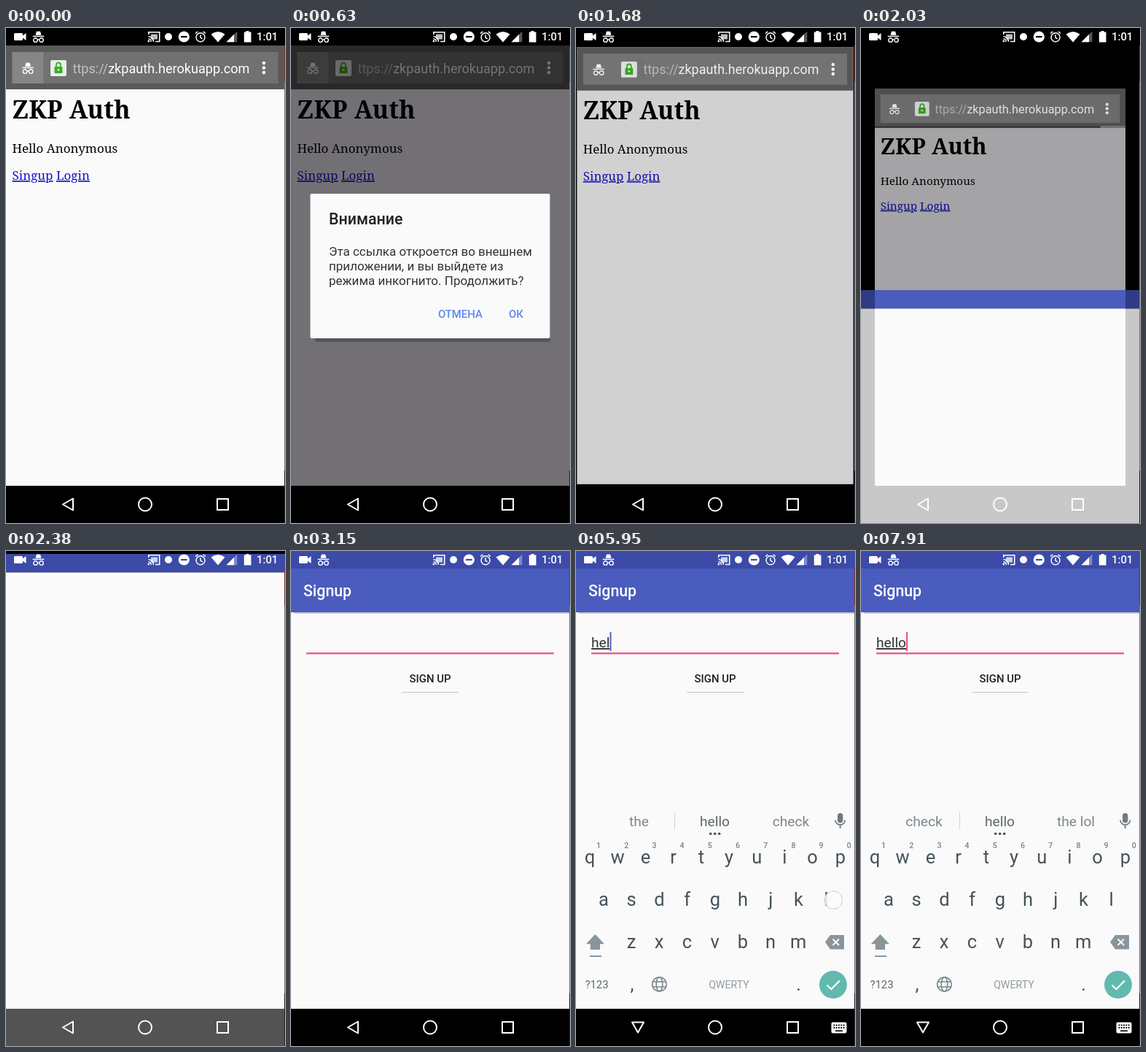
An HTML page that plays this animation: 383 px wide and 678 px high, repeating every 8 s.

```html
<!DOCTYPE html>
<html lang="en">
<head>
<meta charset="utf-8">
<title>Signup demo</title>
<style>
html, body { margin: 0; width: 100%; height: 100%; overflow: hidden; background: #000; }
svg { display: block; width: 100%; height: 100%; }
text { font-family: Roboto, "Noto Sans", sans-serif; white-space: pre; }
.serif text { font-family: "Noto Serif", serif; font-size: 17px; }
.med { font-weight: 500; }
.mid { text-anchor: middle; }
.u { text-decoration: underline; }
.line { fill: none; stroke: #fff; }
</style>
</head>
<body>
<svg viewBox="0 0 383 678" preserveAspectRatio="none">
<defs>
  <clipPath id="cutCard"><rect id="cardBox" y="24" width="382" height="603"/></clipPath>
  <clipPath id="cutUrl"><rect x="90" y="40" width="246" height="30"/></clipPath>
  <clipPath id="cutKeys"><rect y="340" width="383" height="287"/></clipPath>
  <linearGradient id="urlFade"><stop offset="0" stop-color="#717171"/><stop offset="1" stop-color="#717171" stop-opacity="0"/></linearGradient>
  <g id="spy">
    <path d="M-4-2.2-2.6-7.2Q-1.3-7.9 0-7.2 1.3-7.9 2.6-7.2L4-2.2Z" fill="#fff"/>
    <path d="M-7.8-.6H7.8" stroke="#fff" stroke-width="1.5"/>
    <g class="line" stroke-width="1.4"><circle cx="-4" cy="4.6" r="2.8"/><circle cx="4" cy="4.6" r="2.8"/><path d="M-1.3 4Q0 3.2 1.3 4"/></g>
  </g>
</defs>

<rect width="383" height="678"/>

<g id="page">
  <rect y="24" width="382" height="603" fill="#fafafa"/>
  <rect y="24" width="382" height="60" fill="#5a5a5a"/>
  <rect id="urlBox" x="8.5" y="33" width="365" height="43"/>
  <rect id="badge" x="8.5" y="33" width="43" height="43" fill="#868686"/>
  <use href="#spy" x="30" y="55"/>
  <rect x="61" y="44" width="22" height="22" rx="2" fill="#ececec"/>
  <rect x="66.5" y="53" width="11" height="9" rx="1" fill="#3bb022"/>
  <path d="M69 53V50.5a3 3 0 0 1 6 0V53" fill="none" stroke="#3bb022" stroke-width="1.8"/>
  <circle cx="72" cy="57.3" r="1.4" fill="#ececec"/>
  <text clip-path="url(#cutUrl)" x="334.5" y="61.5" text-anchor="end" font-size="18.1" fill="#fff"><tspan fill="#c2c2c2">https://</tspan>zkpauth.herokuapp.com</text>
  <rect x="89" y="42" width="5" height="26" fill="url(#urlFade)"/>
  <g fill="#fff"><circle cx="354" cy="48" r="2.3"/><circle cx="354" cy="54.5" r="2.3"/><circle cx="354" cy="61" r="2.3"/></g>
  <g id="load"><rect y="81" width="344" height="2.5" fill="#3e3e3e"/><rect x="344" y="81" width="38" height="2.5" fill="#8c8c8c"/></g>
  <g class="serif">
    <text x="8.5" y="124" style="font-size:34px" font-weight="700">ZKP Auth</text>
    <text x="8.5" y="171">Hello Anonymous</text>
    <text x="8.5" y="208" fill="#1414cc"><tspan class="u">Singup</tspan> <tspan class="u">Login</tspan></text>
  </g>
  <rect id="dimBar" y="24" width="382" height="60" fill="#000"/>
  <rect id="dim" y="84" width="382" height="543" fill="#050008"/>
</g>

<g id="dialog">
  <rect x="33" y="233" width="323" height="197" rx="3" fill="#000" opacity=".25"/>
  <rect x="26.5" y="227" width="329" height="198" rx="2" fill="#fbfafb"/>
  <text class="med" x="52" y="268.5" font-size="21.3" fill="#212121">Внимание</text>
  <g font-size="17" fill="#333">
    <text x="52" y="312">Эта ссылка откроется во внешнем</text>
    <text x="52" y="332">приложении, и вы выйдете из</text>
    <text x="52" y="352">режима инкогнито. Продолжить?</text>
  </g>
  <g class="med" font-size="14.9" fill="#5a8af0">
    <text x="202" y="397">ОТМЕНА</text><text x="299" y="397">ОК</text>
  </g>
</g>

<g id="win">
  <rect width="383" height="25.4" fill="#3c4aa8"/>
  <rect y="25.4" width="383" height="653" fill="#fafafa"/>
</g>
<g id="mid" clip-path="url(#cutCard)">
  <g id="midMove"><rect width="383" height="26" fill="#4a5cbd"/><rect y="25.4" width="383" height="653" fill="#fafafa"/></g>
</g>

<g id="form">
  <rect x="4" y="84" width="378" height="1.8" fill="#c6c6c8"/>
  <rect y="24" width="383" height="60" fill="#4a5cbd"/>
  <text class="med" x="17" y="62" font-size="21.3" fill="#fff">Signup</text>
  <rect x="21" y="139" width="340" height="2.4" fill="#ee5a90"/>
  <text class="med mid" x="191" y="180" font-size="14.9" fill="#212121">SIGN UP</text>
  <rect x="152" y="193" width="78" height="1.2" fill="#cacaca"/>
</g>
<text id="typed" x="21" y="132" font-size="19.2" fill="#333"></text>
<rect id="caret" y="111" width="2.1" height="26"/>

<g clip-path="url(#cutKeys)"><g id="keys"></g></g>

<rect id="navBg" y="627" width="383" height="51"/>
<g class="line" stroke-width="2">
  <path id="back" d="M78 652.5 92 644.5V660.5Z" stroke-linejoin="round"/>
  <circle cx="191" cy="652.5" r="9"/>
  <rect x="290" y="645" width="15" height="15"/>
</g>
<g id="imeIcon">
  <rect x="350.5" y="645.5" width="21" height="15" rx="2" fill="#fff"/>
  <path d="M353.5 649.5H369M353.5 653H369" stroke="#000" stroke-width="1.8" stroke-dasharray="1.8 1.5"/>
  <path d="M356 657.3H366" stroke="#000" stroke-width="1.7"/>
</g>

<g fill="#fff">
  <path d="M12.5 7H21.5Q23 7 23 8.5V10.5L27.5 7V17L23 13.5V15.5Q23 17 21.5 17H12.5Q11 17 11 15.5V8.5Q11 7 12.5 7Z"/>
  <use href="#spy" x="44.5" y="12"/>
  <path class="line" style="fill:none" stroke-width="1.6" d="M195.8 9V5.8H210.7V18.5H205M195.5 11.5a7.5 7.5 0 0 1 7 7.3M195.5 14.7a4 4 0 0 1 3.8 4"/>
  <rect x="199" y="8.5" width="9" height="7" opacity=".75"/>
  <circle cx="195.9" cy="18" r="1.4"/>
  <circle cx="223" cy="12" r="5"/>
  <circle cx="244.3" cy="12" r="7.6"/>
  <g class="line" style="fill:none" stroke-width="1.5"><circle cx="267" cy="12.7" r="6"/><path d="M267 9.3V13L269.7 14.8M260 7.5 263.3 4.8M274 7.5 270.7 4.8"/></g>
  <path d="M281.5 8.5Q291 1.5 300.5 8.5L291 19.5Z"/>
  <path d="M302.5 19.3 317.3 4.5V19.3Z" opacity=".35"/>
  <path d="M302.5 19.3 313 8.8V19.3Z"/>
  <path d="M329.5 5.5V4H333.5V5.5H336.5V19.5H326.8V5.5Z"/>
  <text class="med" x="344" y="17.4" font-size="14.9">1:01</text>
</g>
<rect id="dndBar" x="240" y="10.9" width="8.6" height="2.2"/>

<rect x="382" y="24" width="1" height="50" fill="#7a3022"/>
<rect x="382" y="74" width="1" height="532" fill="#777"/>
<rect x="382" y="606" width="1" height="72" fill="#222"/>
<circle id="tap" r="12.3" fill="#fafafc" fill-opacity=".85" stroke="#c3c3e4" stroke-width="1" stroke-dasharray="9 2"/>
</svg>

<script>
const STEP = 70, LOOP = 8000;
const $ = id => document.getElementById(id);
const set = (id, attrs) => { for (const k in attrs) $(id).setAttribute(k, attrs[k]); };
const show = (id, on) => set(id, { opacity: +on });

// Linear interpolation through time, value pairs
function track(t, ...p) {
  if (t <= p[0]) return p[1];
  for (let i = 2; i < p.length; i += 2)
    if (t <= p[i]) return p[i - 1] + (p[i + 1] - p[i - 1]) * (t - p[i - 2]) / (p[i] - p[i - 2]);
  return p[p.length - 1];
}
const smooth = (t, a, b) => { const u = track(t, a, 0, b, 1); return u * u * (3 - 2 * u); };
// Value of the last entry already reached
const at = (t, list) => list.reduce((v, e) => t >= e[0] ? e[1] : v, list[0][1]);

function buildKeys() {
  const label = (x, y, size, fill, s, extra = '') =>
    `<text class="mid" x="${x}" y="${y}" font-size="${size}" fill="${fill}" ${extra}>${s}</text>`;
  const ink = '#455259', soft = '#8a959b';
  let out = '<rect y="345" width="383" height="282" fill="#fafafa"/>';
  [['qwertyuiop', 19], ['asdfghjkl', 38], ['zxcvbnm', 76]].forEach(([row, x0], r) =>
    [...row].forEach((c, i) => {
      const x = x0 + 38.2 * i;
      out += label(x, 428 + 58 * r, 25.5, ink, c);
      if (!r) out += label(x + 12, 407, 10.6, '#78838a', (i + 1) % 10, 'font-weight="500"');
    }));
  out += `<g id="strip"><rect x="135" y="357" width="1" height="25" fill="#d0d3d5"/>
    ${label(86.5, 377, 19.2, '#7c878d', '', 'id="w0"')}${label(190.5, 377, 19.2, '#5b676d', '', 'id="w1"')}${label(295, 377, 19.2, '#7c878d', '', 'id="w2"')}
    <g fill="#455259"><circle cx="184.7" cy="387.3" r="1.8"/><circle cx="190.7" cy="387.3" r="1.8"/><circle cx="196.7" cy="387.3" r="1.8"/></g></g>
    <rect x="359" y="359" width="7.4" height="13.5" rx="3.7" fill="#6f7a80"/>
    <path d="M356 368.5a6.7 6.7 0 0 0 13.4 0M362.7 375V380" fill="none" stroke="#6f7a80" stroke-width="1.8"/>
    <path d="M26.3 525 39 538.3H33V546H19.7V538.3H13.7Z" fill="${soft}"/>
    <rect x="19" y="554" width="16" height="2" fill="${soft}"/>
    <path d="M349 526H368V545.5H349L342 535.7Z" fill="${soft}"/>
    <path d="M352.5 531.5 361 540M361 531.5 352.5 540" stroke="#fafafa" stroke-width="2"/>
    ${label(28.5, 599, 14.9, '#5b676d', '?123')}${label(77, 602, 25, ink, ',')}${label(305.5, 602, 25, ink, '.')}
    ${label(210, 598.5, 14.2, '#929ca2', 'QWERTY')}
    <g fill="none" stroke="#7c878d" stroke-width="1.6"><circle cx="114.5" cy="593.5" r="9.8"/>
    <ellipse cx="114.5" cy="593.5" rx="4.3" ry="9.8"/><path d="M105.5 590H123.5M105.5 597H123.5"/></g>
    <circle cx="353" cy="594" r="19" fill="#62b9af"/>
    <path d="M344.5 594.5 350.3 600.3 362 588.5" fill="none" stroke="#fff" stroke-width="2.2"/>`;
  $('keys').innerHTML = out;
}

const TEXT = [[0, ''], [5320, 'h'], [5600, 'he'], [5880, 'hel'], [6020, 'hell'], [6160, 'hello'], [6370, 'hello '], [7770, 'hello']];
const WORDS = [[0, '||'], [5320, 'the|hello|check'], [6230, 'check|hello|the lol']];
const CARET = [[0, 0], [3710, 1], [4200, 0], [4760, 1], [5180, 0], [5320, 1], [6860, 0], [7420, 1]];
// start, end, x, y
const TAPS = [
  [280, 420, 37, 203], [1330, 1470, 316, 398],
  [5180, 5320, 229, 478], [5460, 5600, 96, 420], [5740, 5880, 345, 478],
  [5950, 6020, 353.5, 478], [6090, 6160, 325, 421], [6230, 6440, 190, 608], [7630, 7770, 356, 536]
];

function draw(ms) {
  const t = Math.floor(ms / STEP) * STEP;

  // Browser page shrinking away; its toolbar is dimmed less than the content
  const leaving = t >= 1610;
  const s = 1 - .105 * smooth(t, 1600, 2100);
  const dy = track(t, 1720, 0, 2030, 29, 2100, 30.5);
  const top = 325.5 - 301.5 * s + dy, left = 191 * (1 - s);
  const dim = track(t, 420, 0, 630, .55, 1470, .55, 1610, .2, 1680, .165, 2030, .35, 2170, .42);
  set('page', { transform: `translate(${left} ${325.5 * (1 - s) + dy}) scale(${s})` });
  show('dim', dim);
  show('dimBar', leaving ? dim * .35 : dim);
  set('urlBox', { fill: leaving ? '#7a7a7a' : '#717171' });
  show('badge', !leaving);
  show('load', t >= 1890);

  const d = track(t, 420, 0, 630, 1, 1470, 1, 1610, 0), ds = t < 1000 ? .9 + .1 * d : 1;
  set('dialog', { opacity: d, transform: `translate(191 326) scale(${ds}) translate(-191 -326)` });

  // Signup window rising
  const y = track(t, 1820, 678, 1890, 627, 1960, 500, 2030, 359, 2100, 220, 2170, 115, 2240, 50, 2310, 16, 2380, 4, 2450, 0);
  set('win', { transform: `translate(0 ${y})`, opacity: track(t, 1890, .7, 2030, .8, 2380, 1) });
  set('midMove', { transform: `translate(0 ${y})` });
  set('cardBox', { x: left, y: top, width: 382 * s, height: 627 - top });
  show('mid', t >= 1890 && t < 2310);
  set('navBg', { opacity: track(t, 1820, 1, 1890, 0, 2240, 0, 2450, 1) });
  set('form', { opacity: track(t, 2800, 0, 3080, 1) });
  set('dndBar', { fill: y < 12 ? '#3c4aa8' : '#000' });

  // Keyboard
  const k = 1 - (1 - track(t, 3570, 0, 3990, 1)) ** 2;
  set('keys', { transform: `translate(0 ${90 * (1 - k)})`, opacity: k });
  set('back', { transform: `rotate(${-90 * k} 85 652.5)` });
  show('imeIcon', k);
  const words = at(t, WORDS).split('|');
  words.forEach((w, i) => $('w' + i).textContent = w);
  show('strip', words[1] !== '');

  const typed = at(t, TEXT), field = $('typed');
  field.textContent = typed;
  field.setAttribute('class', typed.endsWith(' ') ? '' : 'u');
  set('caret', {
    x: 21 + (typed ? field.getComputedTextLength() : 0),
    opacity: at(t, CARET),
    fill: t >= 5880 && t < 6020 ? '#5868c4' : '#ee4f8a'
  });

  const tap = TAPS.find(p => t >= p[0] && t <= p[1]);
  show('tap', !!tap);
  if (tap) set('tap', { cx: tap[2], cy: tap[3] });
}

buildKeys();
let t0;
function tick(now) {
  t0 ??= now;
  draw((now - t0) % LOOP);
  requestAnimationFrame(tick);
}
draw(0);
requestAnimationFrame(tick);
</script>
</body>
</html>
```
